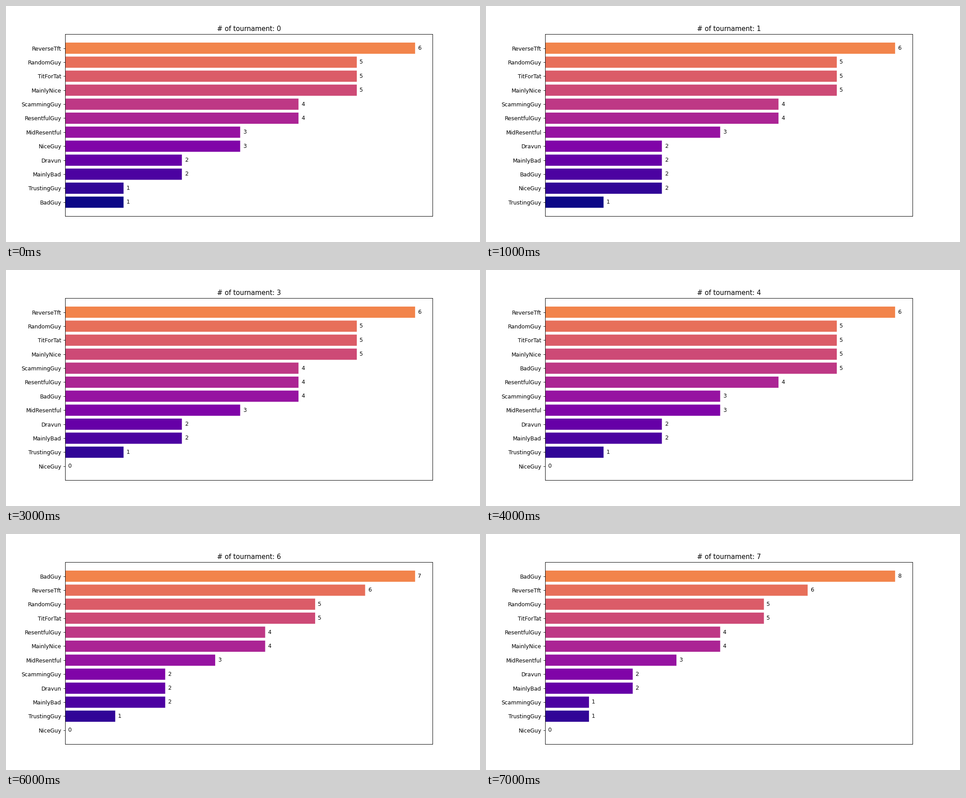
A matplotlib script that plays this animation: 1058 px wide and 529 px high, repeating every 8000 ms.

```python
import matplotlib.pyplot as plt
import numpy as np
from matplotlib.animation import FuncAnimation

FIGSIZE = (12, 6)
DPI = 1058 / 12  # 1058 x 529 pixels

# Starting population; on equal counts, later entries rank higher.
START = {
    "NiceGuy": 3,
    "BadGuy": 1,
    "MainlyNice": 5,
    "MainlyBad": 2,
    "TitForTat": 5,
    "RandomGuy": 5,
    "ReverseTft": 6,
    "MidResentful": 3,
    "ResentfulGuy": 4,
    "Dravun": 2,
    "TrustingGuy": 1,
    "ScammingGuy": 4,
}
WINNER = "BadGuy"
LOSERS = ["NiceGuy"] * 3 + ["ScammingGuy", "MainlyNice"] + ["ScammingGuy"] * 2
COLORS = plt.cm.plasma(np.linspace(0, 0.7, len(START)))

plt.rcParams["font.family"] = "DejaVu Sans"
fig, ax = plt.subplots(figsize=FIGSIZE, dpi=DPI)


def population(tournament):
    """Each tournament, one loser is replaced by a copy of the winner."""
    counts = dict(START)
    for loser in LOSERS[:tournament]:
        counts[loser] -= 1
        counts[WINNER] += 1
    return counts


def draw(tournament):
    counts = population(tournament)
    names = sorted(counts, key=counts.get)
    ax.clear()
    bars = ax.barh(names, [counts[name] for name in names],
                   color=COLORS, snap=False)
    ax.bar_label(bars, padding=5)
    ax.set_xticks([])
    ax.set_title(f"# of tournament: {tournament}")


anim = FuncAnimation(fig, draw, frames=len(LOSERS) + 1, init_func=lambda: None,
                     interval=1000, repeat=True, repeat_delay=0)
plt.show()
```
